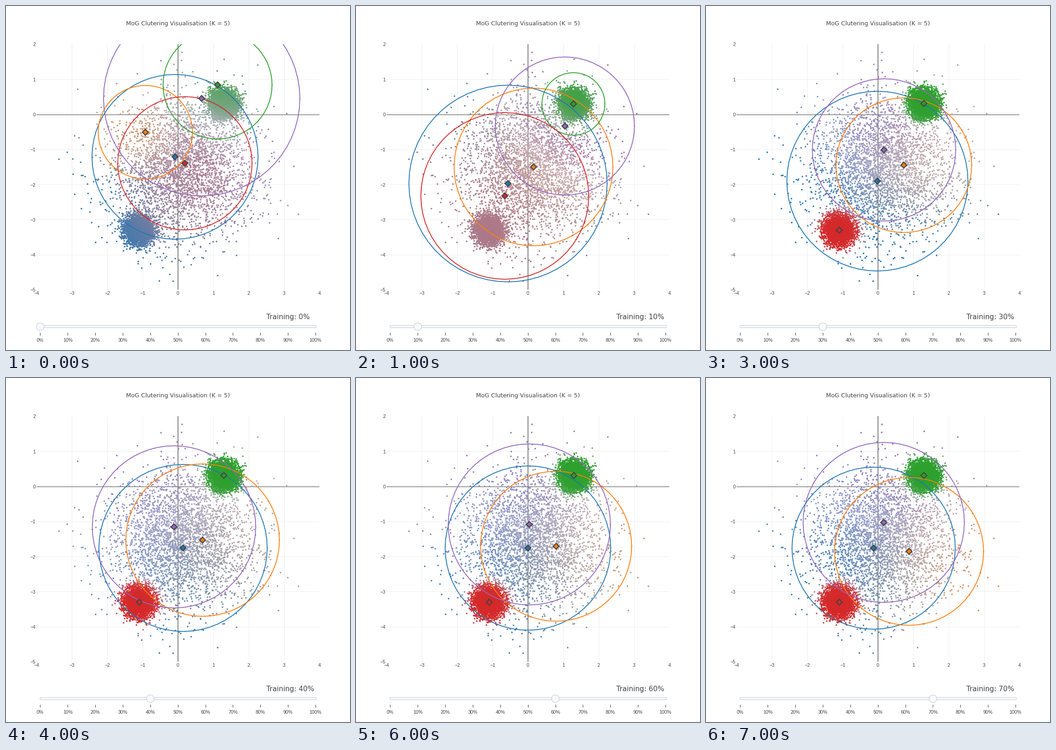
Recreate the animation shown at these times as a matplotlib script. Size 748 px wide and 748 px high, loop 8 s.

```python
import numpy as np
import matplotlib.pyplot as plt
from matplotlib.animation import FuncAnimation
from matplotlib.colors import to_rgb
from matplotlib.patches import Circle, FancyBboxPatch, Polygon, Rectangle

SIZE, DPI = 748, 100
PT = 72 / DPI                       # points per pixel
LEFT, RIGHT, TOP, BOTTOM = 66.5, 681.5, 83, 617
UX, UY = (RIGHT - LEFT) / 8, (BOTTOM - TOP) / 7
GREY, PALE, EDGE = "#444444", "#eeeeee", "#bec8d9"
STEPS = 8

# Each component: colour, then key poses as step: (centre x, centre y, radius)
COMPONENTS = [
    ("#1f77b4", {0: (367.5, 328, 180.5), 1: (330.5, 386, 215.5), 2: (366, 387, 204.5),
                 4: (385, 369.5, 183), 7: (364.5, 370, 177.5)}),
    ("#ff7f0e", {0: (303, 274.5, 102.5), 1: (386, 350, 172.7), 2: (431.5, 342.5, 137),
                 4: (427.5, 352.5, 167), 7: (441.5, 377, 162)}),
    ("#2ca02c", {0: (460, 171.5, 118.5), 1: (472.7, 213, 68.5), 2: (473.7, 212, 45.3),
                 3: (473.7, 212, 38.5)}),
    ("#d62728", {0: (389, 342, 146), 1: (323.5, 413, 182.5), 2: (292.3, 481, 99),
                 3: (289.7, 487.5, 40)}),
    ("#9467bd", {0: (425.5, 201, 213.5), 1: (454.2, 261, 151.3), 2: (399, 307, 144),
                 4: (365.3, 323.7, 177.7), 7: (386.5, 314, 175.3)}),
]
COLORS = [color for color, _ in COMPONENTS]


def pose(keys, step):
    """Centre and radius at a step, drifting slowly out of each key pose."""
    before = max(k for k in keys if k <= step)
    after = min((k for k in keys if k > step), default=before)
    if after == before:
        return np.array(keys[before], float)
    t = ((step - before) / (after - before)) ** 1.5
    return (1 - t) * np.array(keys[before]) + t * np.array(keys[after])


def poses(step):
    return np.array([pose(keys, step) for _, keys in COMPONENTS])


def to_px(x, y):
    return LEFT + (x + 4) * UX, TOP + (2 - y) * UY


def make_points():
    rng = np.random.default_rng(7)

    def blob(x, y, sigma):
        z = rng.normal(size=(2, 3333)) * sigma
        return np.column_stack(to_px(x + z[0], y + z[1]))

    pts = np.vstack([blob(1.3, 0.31, 0.2), blob(-1.1, -3.3, 0.2), blob(0.106, -1.527, 0.994)])
    return rng.permutation(pts)


def mix_colors(pts, step):
    """Blend component colours by responsibility, paler where undecided."""
    comps = poses(step)
    var = (comps[:, 2] / 2.45) ** 2
    d2 = ((pts[:, None, :] - comps[None, :, :2]) ** 2).sum(axis=2)
    tight = 1 + min(step, 2) ** 3 / 4
    weights = np.array([1.4, 0.5, tight, tight, 1])
    log_p = np.log(weights / var) - d2 / (2 * var)
    resp = np.exp(log_p - log_p.max(axis=1, keepdims=True))
    resp /= resp.sum(axis=1, keepdims=True)
    rgb = resp @ np.array([to_rgb(c) for c in COLORS])
    lift = 0.62 * (1 - resp.max(axis=1, keepdims=True))
    return rgb + (1 - rgb) * lift


def label(x, y, s, px, ha="center", font="Liberation Sans"):
    return ax.text(x, y, s, fontsize=px * PT, ha=ha, va="baseline", color=GREY, family=font)


def line(xs, ys, color, zorder, width=1, **kw):
    ax.plot(xs, ys, color=color, lw=width * PT, zorder=zorder, solid_capstyle="butt", **kw)


def slider_x(k):
    return 74.5 + 59.85 * k


fig = plt.figure(figsize=(SIZE / DPI, SIZE / DPI), dpi=DPI, facecolor="white")
ax = fig.add_axes([0, 0, 1, 1])
ax.set_xlim(0, SIZE)
ax.set_ylim(SIZE, 0)
ax.set_autoscale_on(False)
ax.axis("off")

# Grid, zero lines and axis labels
for v in range(-5, 5):
    x, y = to_px(v, v)
    text = str(v).replace("-", "\u2212")
    if v > -5:
        label(x, 628.3, text, 10.4)
    if v < 3:
        label(64.3, y + 4.4, text, 10.4, "right")
    if v and -4 < v < 4:
        line([x, x], [TOP, BOTTOM], PALE, 1)
    if v and -5 < v < 2:
        line([LEFT, RIGHT], [y, y], PALE, 1)
line([LEFT, RIGHT], [236.5, 236.5], GREY, 2, snap=False)
line([374, 374], [TOP, BOTTOM], GREY, 2, 1.3, snap=False)

label(374, 41.5, "MoG Clutering Visualisation (K = 5)", 12.8, font="DejaVu Sans")
status = label(566.5, 681, "", 15.25, "left", "DejaVu Sans")

# Slider
ax.add_patch(FancyBboxPatch((76, 696.5), 597, 1, boxstyle="round,pad=2,rounding_size=2",
                            fc="#f8fafc", ec=EDGE, lw=PT, zorder=3))
for k in range(11):
    line([slider_x(k)] * 2, [710, 716], "#333333", 3)
    label(slider_x(k), 730.2, f"{10 * k}%", 10.4)
grip = ax.add_patch(Circle((0, 0), 8.3, fc="#f8fafc", ec=EDGE, lw=PT, zorder=4))

# Data, component outlines and centres
points = make_points()
plot_box = Rectangle((LEFT, TOP), RIGHT - LEFT, BOTTOM - TOP, transform=ax.transData)
dots = ax.scatter(points[:, 0], points[:, 1], s=(3.5 * PT) ** 2, linewidths=0, zorder=5)
dots.set_clip_path(plot_box)
angle = np.linspace(0, 2 * np.pi, 61)
diamond = 6.4 * np.array([(1, 0), (0, 1), (-1, 0), (0, -1)])
rings, marks = [], []
for c in COLORS:
    ring, = ax.plot([], [], color=c, lw=1.8 * PT, zorder=6)
    ring.set_clip_path(plot_box)
    rings.append(ring)
    marks.append(ax.add_patch(Polygon(diamond, fc=c, ec=GREY, lw=2.2 * PT,
                                      joinstyle="miter", zorder=7)))


def draw(step):
    dots.set_facecolor(mix_colors(points, step))
    for (cx, cy, r), ring, mark in zip(poses(step), rings, marks):
        ring.set_data(cx + r * np.cos(angle), cy + r * UY / UX * np.sin(angle))
        mark.set_xy(diamond + (cx, cy))
    grip.center = (slider_x(step), 697.3)
    status.set_text(f"Training: {10 * step}%")
    return [dots, grip, status, *rings, *marks]


anim = FuncAnimation(fig, draw, frames=STEPS, interval=1000, repeat=True,
                     repeat_delay=0, blit=False)
plt.show()
```
